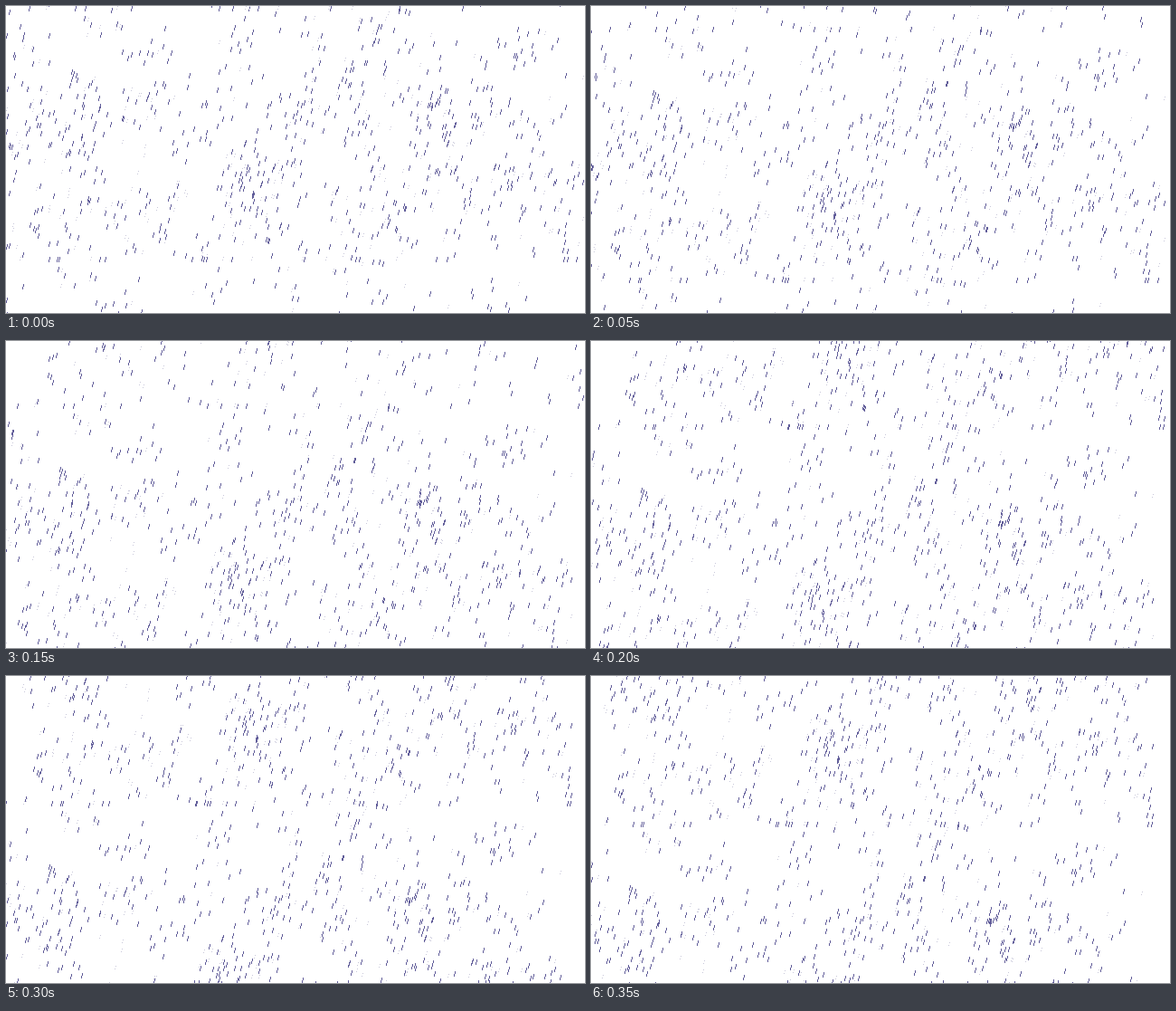
Recreate the animation shown at these times as an HTML page with a canvas. Size 640x339 px, loop 400 ms.

```html
<!DOCTYPE html>
<html lang="en">
<head>
<meta charset="utf-8">
<title>Rain</title>
<style>
html, body { margin: 0; width: 100%; height: 100%; overflow: hidden; background: #fff; }
canvas { display: block; }
</style>
</head>
<body>
<canvas id="rain" width="640" height="339"></canvas>
<script>
const ctx = document.getElementById('rain').getContext('2d');
const STEP_MS = 50, STEPS = 8, SHOWER_STEP = 4;
const FALL = { x: -4.2, y: 23 };
const SHEET = { width: 637, height: 277, shift: 29 };
const DARK = '#625e9a', PALE = '#c9c8da';

function seededRandom(seed) {
  return () => {
    seed = (seed + 0x6d2b79f5) | 0;
    let t = Math.imul(seed ^ (seed >>> 15), 1 | seed);
    t = (t + Math.imul(t ^ (t >>> 7), 61 | t)) ^ t;
    return ((t ^ (t >>> 14)) >>> 0) / 4294967296;
  };
}

const random = seededRandom(4711);
const spread = size => (random() - 0.5) * size;

// Drops fall in small loose groups, more of them low on the sheet.
function makeDrops(count) {
  const drops = [];
  while (drops.length < count) {
    const x = random() * SHEET.width;
    const y = SHEET.height * random() ** 0.8;
    const size = 1 + Math.floor(random() * 4);
    for (let i = 0; i < size; i++) {
      drops.push({
        x: Math.min(SHEET.width, Math.max(0, x + spread(26))),
        y: Math.min(SHEET.height, Math.max(0, y + spread(36))),
        faint: random() < 0.28,
        sparse: random() < 0.55
      });
    }
  }
  return drops;
}

const drops = makeDrops(860);

function drawDrop(x, y, faint) {
  ctx.fillStyle = faint ? PALE : DARK;
  const length = faint ? 1 : 3;
  ctx.fillRect(x + 1, y, 1, length);
  ctx.fillRect(x, y + 3, 1, length);
}

// The neighbouring sheets are thin until the shower reaches the top edge.
function drawSheet(index, step) {
  const dx = FALL.x * step - SHEET.shift * index;
  const dy = FALL.y * step + SHEET.height * index;
  const thin = index !== 0 && step < SHOWER_STEP;
  for (const { x, y, faint, sparse } of drops) {
    if (thin && !sparse) continue;
    if (index < 0 && (x < 12 || x > 622)) continue;
    drawDrop(Math.round(x + dx), Math.round(y + dy), faint);
  }
}

function render(time) {
  const step = Math.floor(time / STEP_MS) % STEPS;
  ctx.fillStyle = '#fff';
  ctx.fillRect(0, 0, 640, 339);
  for (const index of [-1, 0, 1]) drawSheet(index, step);
}

let start;
function tick(now) {
  start ??= now;
  render(now - start);
  requestAnimationFrame(tick);
}
render(0);
requestAnimationFrame(tick);
</script>
</body>
</html>
```
